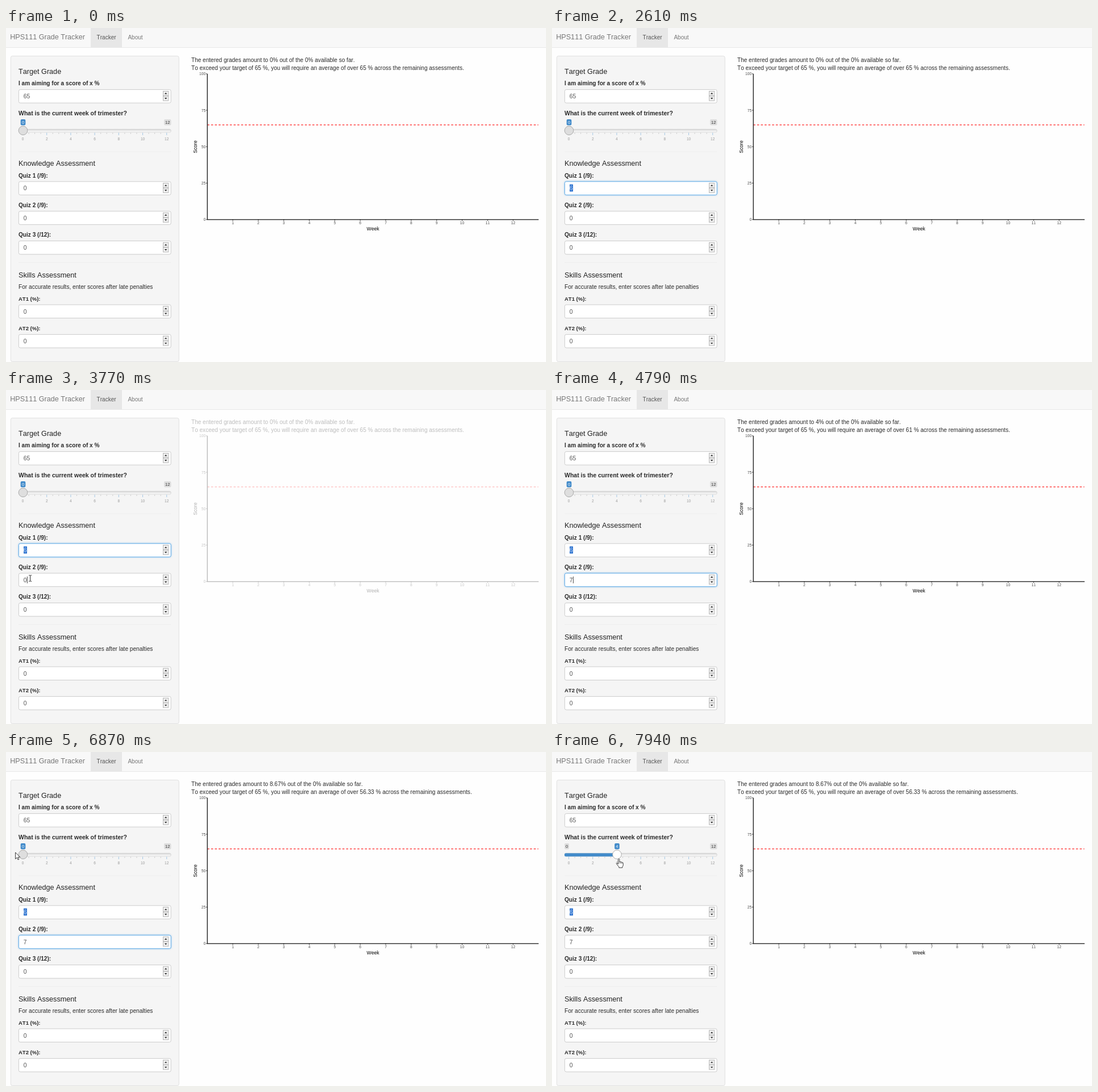
Write an HTML page that moves like this. It is 950 px wide and 589 px high and loops after 8000 ms.

```html
<!DOCTYPE html>
<html lang="en">
<head>
<meta charset="utf-8">
<title>Grade Tracker</title>
<style>
html, body { margin: 0; width: 100%; height: 100%; overflow: hidden; background: #fefefe; }
svg { display: block; font-family: "Liberation Sans", Arial, sans-serif; font-kerning: none; }
.glow { filter: drop-shadow(0 0 1.8px rgba(102, 175, 233, .7)); }
</style>
</head>
<body>
<svg id="stage" width="950" height="589" viewBox="0 0 950 589">
  <defs>
    <linearGradient id="track" x2="0" y2="1"><stop stop-color="#d8d8d8"/><stop offset="1" stop-color="#fff"/></linearGradient>
  </defs>
</svg>
<script>
const LOOP = 8000, BODY = 10.05, HEAD = 12.65;
const stage = document.getElementById('stage');
const $ = id => document.getElementById(id);

const text = (x, y, s, { size = BODY, fill = '#2b2b2b', bold, anchor = 'start', extra = '' } = {}) =>
  `<text x="${x}" y="${y}" font-size="${size}" fill="${fill}" text-anchor="${anchor}"${bold ? ' font-weight="700"' : ''} ${extra}>${s}</text>`;
const rect = (x, y, w, h, fill, extra = '') =>
  `<rect x="${x}" y="${y}" width="${w}" height="${h}" fill="${fill}" ${extra}/>`;
const path = (d, stroke, width = 1, extra = '') =>
  `<path d="${d}" fill="none" stroke="${stroke}" stroke-width="${width}" ${extra}/>`;
const label = (y, s, size = 10.1) => text(22, y, s, { bold: true, size });
const heading = (y, s) => text(22, y, s, { size: HEAD, fill: '#222' });

// Number input centred on y, with its focus ring, selection, value and caret
function field(id, y, value) {
  const box = (fill, stroke, extra) => rect(22.4, y - 11.8, 267.8, 23.6, fill, `rx="2.8" stroke="${stroke}" ${extra}`);
  const button = (top, tip) => rect(276.4, top, 9.4, 8.2, '#efefef', 'stroke="#a9a9a9" stroke-width=".8"') +
    `<path d="M278.9 ${top + 4.1 - tip}h4.4l-2.2 ${2.4 * tip}z" fill="#222"/>`;
  return box('#fff', '#ccc', '') + box('#fff', '#66afe9', `class="glow" id="${id}Ring" opacity="0"`) +
    rect(31, y - 6.8, 6, 12.6, '#2f74d0', `id="${id}Sel" visibility="hidden"`) +
    text(30.8, y + 3.7, value, { size: 10.3, fill: '#555', extra: `id="${id}Val"` }) +
    rect(36.9, y - 6, .9, 12, '#333', `id="${id}Caret" visibility="hidden"`) +
    button(y - 9, -1) + button(y - .4, 1);
}

function slider() {
  const weekX = w => 29.5 + 21.1 * w;
  let ticks = '';
  for (let i = 0; i <= 24; i++) {
    const major = i % 4 == 0;
    ticks += path(`M${weekX(i / 2)} 184.5v${major ? 4.5 : 2.5}`, major ? '#8fbbe0' : '#c4c4c4', .8);
  }
  for (let w = 0; w <= 12; w += 2)
    ticks += text(weekX(w), 198.2, w, { size: 6.5, fill: '#999', anchor: 'middle' });
  const tag = (x, w, s, fill, color, extra = '') => `<g ${extra}>` + rect(x - w / 2, 161, w, 10.6, fill, 'rx="2"') +
    text(x, 168.9, s, { size: 7.4, fill: color, anchor: 'middle' }) + '</g>';
  return ticks + rect(22.3, 178.6, 268, 5.4, 'url(#track)', 'rx="2.7" stroke="#ccc" stroke-width=".7"') +
    rect(22, 178.4, 0, 5.8, '#428bca', 'id="bar" rx="2"') +
    tag(26, 8, 0, '#ddd', '#333', 'id="minTag" visibility="hidden"') + tag(284.2, 12.4, 12, '#ddd', '#333') +
    '<g id="knob">' + tag(0, 8.6, '<tspan id="week">0</tspan>', '#428bca', '#fff') +
    '<circle id="handle" cy="180.8" r="7.8" stroke="#a4a4a4" stroke-width=".9"/></g>';
}

function chart() {
  const left = 354.2, bottom = 337.8, weekX = w => left + 44.83 * w;
  const tick = { size: 6.7, fill: '#4d4d4d' };
  let s = text(326, 59.6, '', { extra: 'id="line1"' }) + text(326, 73.6, '', { extra: 'id="line2"' }) +
    path(`M${left} 170.9H936.5`, '#f22', 1.3, 'stroke-dasharray="3.6 3"') +
    path(`M${left} 81V${bottom}H937`, '#111', 1.3);
  for (let v = 0; v <= 100; v += 25) {
    const y = bottom - 2.57 * v;
    s += path(`M${left - 2.2} ${y}h2.2`, '#333') + text(351.2, y + 2.5, v, { ...tick, anchor: 'end' });
  }
  for (let w = 1; w <= 12; w++)
    s += path(`M${weekX(w)} ${bottom}v2.2`, '#333') + text(weekX(w), 346.2, w, { ...tick, anchor: 'middle' });
  const title = { size: 8.6, fill: '#000', anchor: 'middle' };
  return `<g id="output">${s}` + text(645.6, 356.8, 'Week', title) +
    text(0, 0, 'Score', { ...title, extra: 'transform="translate(335.7 209.5) rotate(-90)"' }) + '</g>';
}

// Pointer shapes, each with its hot spot at 0,0
const beam = 'M-2.4 -5.3h1.7l.7 .6 .7-.6h1.7M0 -4.8V4.8M-2.4 5.3h1.7l.7-.6 .7 .6h1.7';
const pointers = '<g id="beam">' + path(beam, '#fff', 2.2, 'opacity=".6"') + path(beam, '#222', 1) + '</g>' +
  '<g id="arrow" fill="#fff" stroke="#222" stroke-width=".9"><path d="M0 0V11.6L2.7 9.1L4.5 13L6.3 12.2L4.6 8.4H8.2Z"/></g>' +
  '<g id="hand" fill="#fff" stroke="#222" stroke-width=".9" stroke-linejoin="round">' +
  '<path d="M-1.2 9.6V1Q0 -.8 1.2 1V5.6Q2.6 4.7 3.5 6Q4.9 5.2 5.6 6.6Q7.4 6.2 7.6 8V11.5Q7.4 13 6.2 14.2V15.8H.2V14.4L-3.9 9.4Q-4 7.4 -2.4 8.2Z"/>' +
  '<path d="M1.2 5.6v3M3.5 6v2.8M5.6 6.6v2.4" stroke-width=".6"/></g>';

stage.innerHTML +=
  rect(0, 0, 950, 34, '#f8f8f8') + rect(0, 34, 950, .9, '#e7e7e7') + rect(149, 0, 55, 34, '#e7e7e7') +
  text(7.2, 20.4, 'HPS111 Grade Tracker', { size: 12.62, fill: '#777' }) +
  text(159.6, 19.8, 'Tracker', { fill: '#555' }) + text(214.4, 19.8, 'About', { fill: '#777' }) +
  rect(8.4, 49.4, 295.8, 539, '#f5f5f5', 'rx="3" stroke="#e0e0e0"') +
  heading(81.2, 'Target Grade') +
  label(101.4, 'I am aiming for a score of x %') + field('goal', 120.4, 65) +
  label(153.6, 'What is the current week of trimester?', 10.5) + slider() +
  path('M22 218H290M22 413.6H290', '#ececec', .9) +
  heading(243.4, 'Knowledge Assessment') +
  label(263.5, 'Quiz 1 (/9):') + field('quiz1', 282.6, 0) +
  label(316, 'Quiz 2 (/9):') + field('quiz2', 334.9, 0) +
  label(368.4, 'Quiz 3 (/12):') + field('quiz3', 387.3, 0) +
  heading(439.6, 'Skills Assessment') +
  text(22, 459.6, 'For accurate results, enter scores after late penalties', { size: 10.13 }) +
  label(481.2, 'AT1 (%):', 9.5) + field('at1', 499.8, 0) +
  label(533.4, 'AT2 (%):', 9.5) + field('at2', 552.2, 0) +
  chart() + pointers;

// Pointer visits: rows of time, x, y
const visits = [
  [[220, 459, 544], [500, 240, 395], [760, 66, 276], [1000, 140, 293], [1300, 140, 293], [1680, -4, 294]],
  [[3070, 6, 312], [3470, 43, 332], [3770, 43, 332], [3850, 16, 334], [3940, 14, 334]],
  [[5330, 33, 336], [5470, 40.5, 350], [5790, 55, 384], [5950, 55, 384], [6100, 72, 386], [6250, 63, 386], [6480, 63, 386],
   [6800, 21, 215], [6870, 16.5, 177], [6950, 18, 178], [7180, 33, 184], [7330, 33, 184], [7930, 117.6, 188.2], [LOOP, 117.6, 188.2]],
];
const ramp = (t, a, b) => Math.min(1, Math.max(0, (t - a) / (b - a)));

function pointerAt(t) {
  const rows = visits.find(r => t >= r[0][0] && t < r[r.length - 1][0]);
  if (!rows) return null;
  const i = rows.findIndex(r => r[0] > t), a = rows[i - 1], b = rows[i], k = ramp(t, a[0], b[0]);
  return { x: a[1] + (b[1] - a[1]) * k, y: a[2] + (b[2] - a[2]) * k };
}
const pointerShape = t => t < 740 ? 'arrow' : t < 6550 ? 'beam' : t < 7020 ? 'arrow' : 'hand';
const show = (id, on) => $(id).setAttribute('visibility', on ? 'visible' : 'hidden');
const set = (id, name, value) => $(id).setAttribute(name, value);
function write(id, s) { if ($(id).textContent != s) $(id).textContent = s; }

function quiz(id, value, selected, ring, caret) {
  write(id + 'Val', value);
  set(id + 'Val', 'fill', selected ? '#c4daf5' : '#555');
  show(id + 'Sel', selected);
  set(id + 'Ring', 'opacity', ring);
  show(id + 'Caret', caret);
}

function draw(t) {
  const p = pointerAt(t);
  for (const id of ['beam', 'arrow', 'hand']) {
    const on = p && id == pointerShape(t);
    show(id, on);
    if (on) set(id, 'transform', `translate(${p.x} ${p.y})`);
  }

  quiz('quiz1', t < 2610 ? 0 : 6, t >= 1590, ramp(t, 1300, 1450) - ramp(t, 3780, 3930), false);
  quiz('quiz2', t < 4790 ? 0 : 7, t >= 3850 && t < 4790, ramp(t, 3780, 3930) - ramp(t, 7330, 7480),
    (t >= 3770 && t < 3850) || (t >= 4790 && t < 6030));

  const [score, need] = t < 3850 ? [0, 65] : t < 5400 ? [4, 61] : [8.67, 56.33];
  write('line1', `The entered grades amount to ${score}% out of the 0% available so far.`);
  write('line2', `To exceed your target of 65 %, you will require an average of over ${need} % across the remaining assessments.`);
  set('output', 'opacity', 1 - .7 * (ramp(t, 3320, 3640) - ramp(t, 3790, 3940)));

  const week = t < 7330 ? 0 : Math.round((p.x - 33) / 21.1), x = 30 + 21.1 * week;
  set('knob', 'transform', `translate(${x} 0)`);
  set('handle', 'fill', t < 7330 ? '#dedede' : '#fff');
  set('bar', 'width', week ? x - 22 : 0);
  show('minTag', week > 0);
  write('week', week);
}

function tick() {
  draw(performance.now() % LOOP);
  requestAnimationFrame(tick);
}
tick();
</script>
</body>
</html>
```
